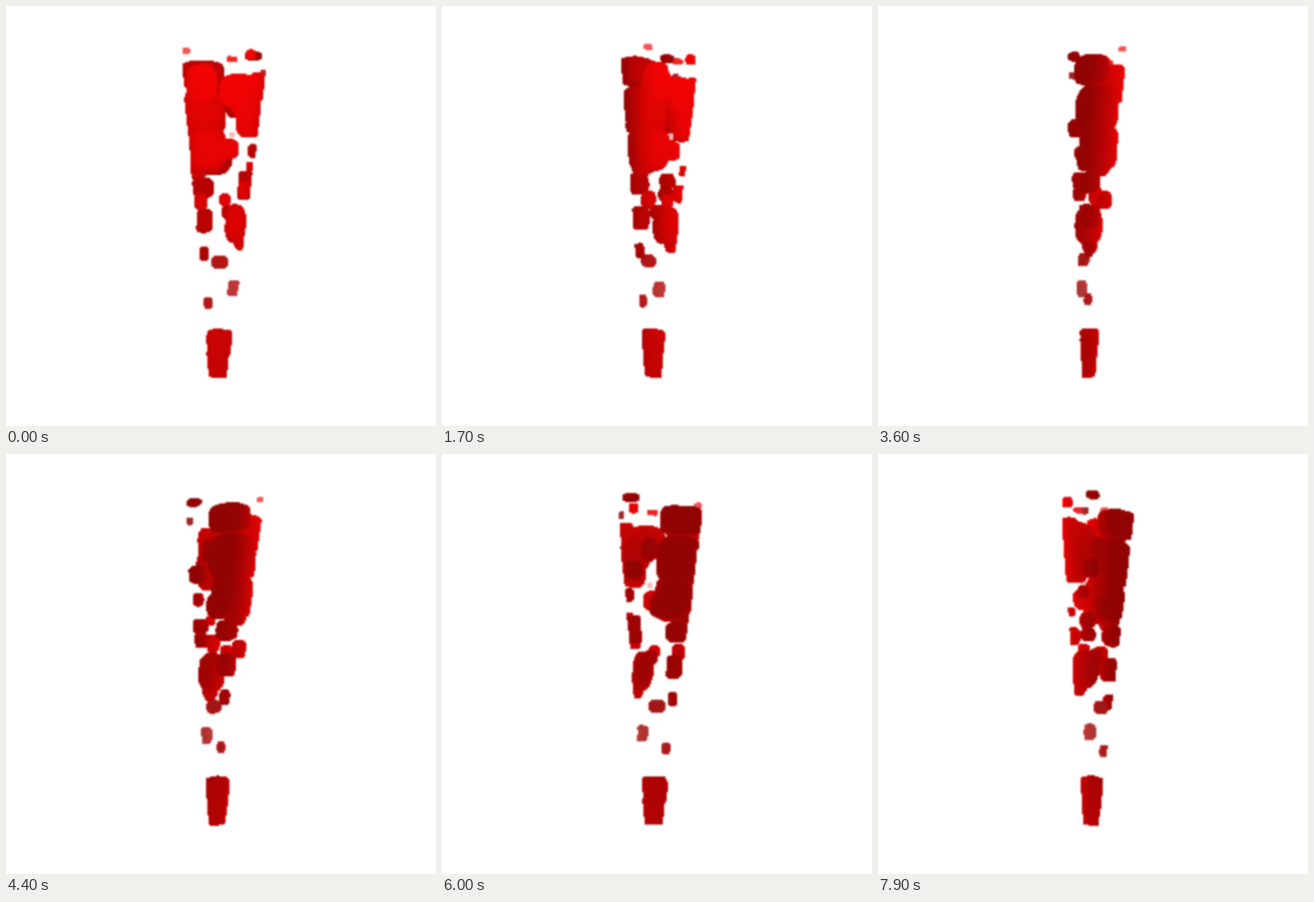
Write an HTML page with a canvas that moves like this. It is 662 by 646 pixels and loops after 8000 ms.

```html
<!DOCTYPE html>
<html lang="en">
<head>
<meta charset="utf-8">
<title>Rotating fragments</title>
<style>
html, body { margin: 0; width: 100%; height: 100%; overflow: hidden; background: #fff; }
canvas { display: block; width: 662px; height: 646px; filter: blur(1.2px); }
</style>
</head>
<body>
<canvas width="331" height="323"></canvas>
<script>
const W = 331, H = 323, STEP = 2, LOOP = 8000, TURN = 12000;
const SPREAD = 2; // a drawn voxel reaches this far beyond its centre
const ctx = document.querySelector('canvas').getContext('2d');
const image = ctx.createImageData(W, H);
const pixels = new Uint32Array(image.data.buffer);
const depth = new Float32Array(W * H);
const voxels = [];

// The flattened, tapering solid that bounds every fragment
function inSolid(x, y, z) {
  const w = 67 - 0.107 * (y - 80);
  return (x / (w - SPREAD)) ** 4 + ((z + 2) / (0.57 * w - SPREAD)) ** 4 < 1;
}

// Colour belongs to the material: dark at the back, bright at the front
function shade(z, pale) {
  const r = Math.max(146, Math.min(251, 190 + 1.7 * z)) + pale * 0.2;
  const g = pale || 3;
  return (255 << 24 | g << 16 | g << 8 | Math.min(255, r)) >>> 0;
}

function blob(x, y, z, rx, ry, rz = rx, { pale = 0, power = 2.4 } = {}) {
  [rx, ry, rz] = [rx, ry, rz].map(r => r - SPREAD);
  const term = (d, r) => Math.abs(d / r) ** power;
  const start = (c, r) => Math.ceil((c - r) / STEP) * STEP;
  for (let j = start(y, ry); j <= y + ry; j += STEP)
    for (let i = start(x, rx); i <= x + rx; i += STEP)
      for (let k = start(z, rz); k <= z + rz; k += STEP)
        if (term(i - x, rx) + term(j - y, ry) + term(k - z, rz) < 1 && inSolid(i, j, k))
          voxels.push({ x: i, y: j, z: k, color: shade(k, pale) });
}

// Loose crumbs along the rim
blob(45, 72, -22, 14, 7, 9);
blob(41, 79, 27, 9, 9, 9);
blob(-59, 74.5, 23, 8, 5, 7, { pale: 85 });
blob(12, 86, 25, 9, 6, 7, { pale: 35 });
blob(61, 99, -19, 7, 7, 7, { pale: 40 });
blob(14, 200, 12, 5, 5, 5, { pale: 185 });

// Upper body, bright wing
blob(54, 154, 19, 17, 50, 20, { power: 4 });
blob(22, 134, 18, 32, 27, 23);
blob(40, 172, 12, 22, 32, 23, { power: 3 });
blob(36, 150, 14, 25, 29, 23);
blob(16, 150, -14, 13, 19, 12);
blob(39, 183, -18, 15, 15, 13);

// Upper body, dark wing
blob(-33, 105, -18, 34, 22, 22, { power: 4 });
blob(-28, 105, 20, 14, 13, 13);
blob(-35, 124, 22, 26, 30, 17);
blob(-8, 107, -25, 9, 9, 8);
blob(-30, 165, -7, 36, 38, 31, { power: 3 });
blob(-24, 222, -1, 31, 36, 29, { power: 3 });
blob(4, 223, 17, 22, 17, 14);
blob(-16, 236, -16, 31, 22, 15);
blob(-37, 248, -3, 15, 22, 16);

// Middle fragments
blob(46, 220, -9, 9, 11, 10);
blob(44, 249, 15, 8, 9, 8);
blob(37, 263, -12, 13, 13, 12);
blob(36, 285, 14, 12, 15, 11);
blob(34, 284, -12, 12, 12, 11);
blob(-29, 277, -16, 18, 16, 15, { power: 3 });
blob(-32, 303, 8, 12, 14, 12);
blob(-26, 329, -12, 14, 19, 14, { power: 3 });
blob(5, 301, 15, 10, 10, 10);
blob(11, 315, -9, 12, 12, 11);
blob(22, 334, 0, 17, 30, 22);
blob(30, 350, 5, 12, 27, 13);

// Lower fragments and foot
blob(-25, 379, -14, 9, 13, 9);
blob(-1, 391, -15, 14, 11, 10, { pale: 22 });
blob(21, 432, -10, 11, 14, 9, { pale: 52 });
blob(-17, 455, -12, 8, 11, 7, { pale: 25 });
blob(1, 534, -3.5, 22, 38, 15, { power: 5 });

function draw(t) {
  const angle = t / TURN * 2 * Math.PI;
  const c = Math.cos(angle), s = Math.sin(angle);
  pixels.fill(0xffffffff);
  depth.fill(-1e9);
  for (const v of voxels) {
    const x = v.x * c + v.z * s;
    const z = v.z * c - v.x * s;
    // The axis leans slightly and is seen from a little below
    const sx = 336.5 - 0.0205 * (v.y - 70) + x;
    const sy = v.y - 0.185 * z + 0.02 * x;
    const left = Math.round(sx / 2) - 1, top = Math.round(sy / 2) - 1;
    for (let n = 0; n < 4; n++) {
      const p = (top + (n >> 1)) * W + left + (n & 1);
      if (z > depth[p]) {
        depth[p] = z;
        pixels[p] = v.color;
      }
    }
  }
  ctx.putImageData(image, 0, 0);
}

let shown = -1;
function tick() {
  const t = Math.floor(performance.now() % LOOP / 100) * 100;
  if (t !== shown) draw(shown = t);
  requestAnimationFrame(tick);
}
tick();
</script>
</body>
</html>
```
